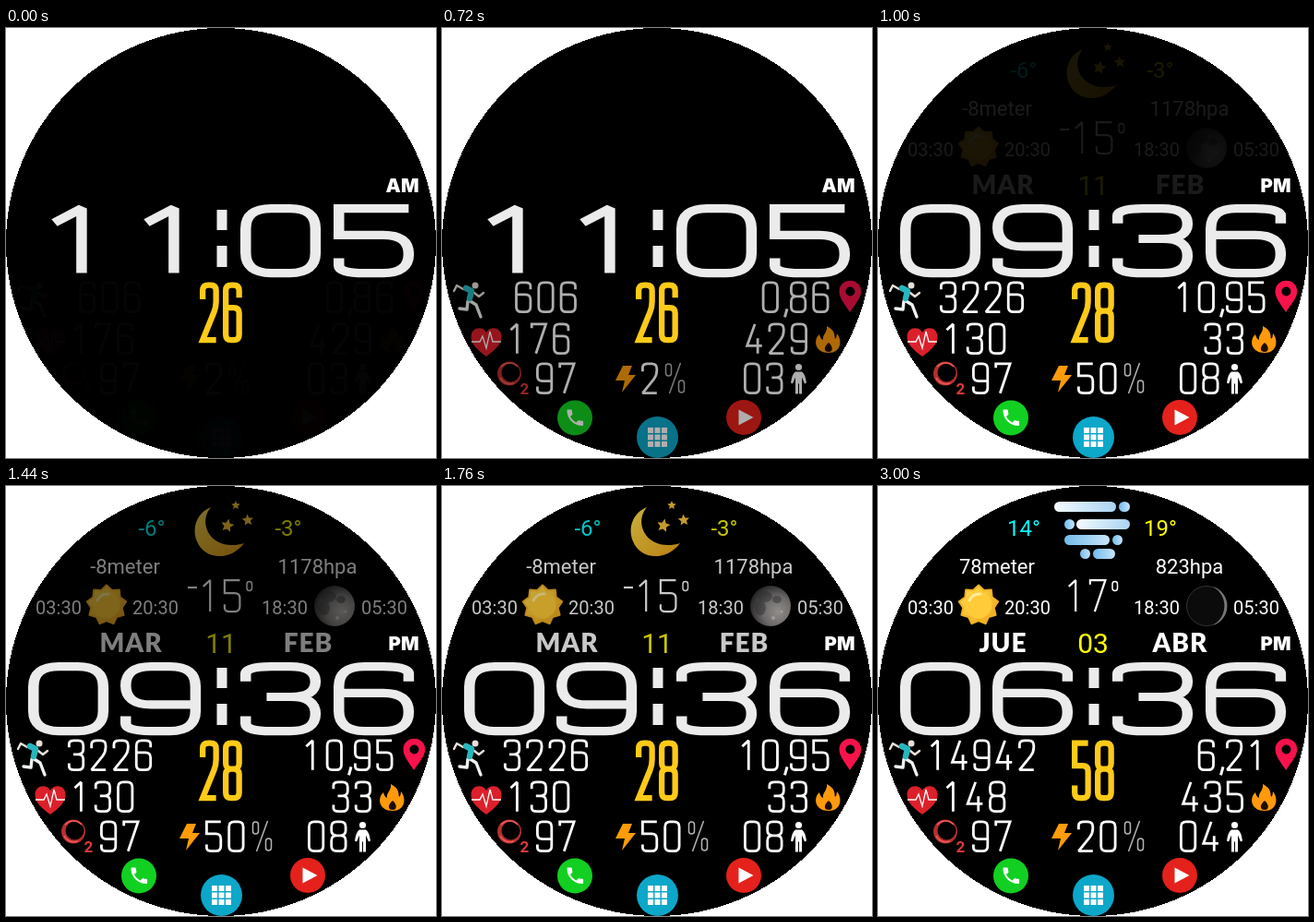
Recreate the animation shown at these times as an HTML page. Size 466 by 466 pixels, loop 4000 ms.

```html
<!DOCTYPE html>
<html lang="es">
<head>
<meta charset="utf-8">
<title>Watch face</title>
<style>
  html, body { margin: 0; width: 100%; height: 100%; overflow: hidden; background: #fff; }
  svg { display: block; width: 100vw; height: 100vh; }
  text { font-family: Roboto, sans-serif; fill: #fff; text-anchor: middle; }
  .label { font: 900 28px Lato, sans-serif; letter-spacing: 1px; }
  .half { font: 900 20.5px Inter, sans-serif; text-anchor: end; }
  .digits { fill: none; stroke: #fff; stroke-miterlimit: 2; }
</style>
</head>
<body>
<svg viewBox="0 0 466 466">
  <defs>
    <linearGradient id="gold" x1="0" y1="0" x2="1" y2="1">
      <stop offset="0" stop-color="#ffe04f"/><stop offset="1" stop-color="#f0a418"/>
    </linearGradient>
    <linearGradient id="cloud" x1="0" y1="0" x2="0" y2="1">
      <stop offset="0" stop-color="#fff"/><stop offset="1" stop-color="#c3cde6"/>
    </linearGradient>
    <linearGradient id="fog">
      <stop offset="0" stop-color="#f4faff"/><stop offset="1" stop-color="#a9d4f2"/>
    </linearGradient>
    <linearGradient id="mist">
      <stop offset="0" stop-color="#72bbeb"/><stop offset="1" stop-color="#c8e6fa"/>
    </linearGradient>
    <radialGradient id="lunar" cx=".68" cy=".64" r=".72">
      <stop offset="0" stop-color="#b8b4b1"/><stop offset=".5" stop-color="#8b8886"/>
      <stop offset="1" stop-color="#2c2c2f"/>
    </radialGradient>
  </defs>
  <circle cx="233" cy="233" r="233" shape-rendering="crispEdges"/>

  <g id="top">
    <g id="weather"></g>
    <g id="topText"></g>
    <path id="sun" fill="url(#gold)" stroke="#f3b126" stroke-width="2" stroke-linejoin="round"/>
    <circle cx="109" cy="129" r="14.500" fill="#ffcb38"/>
    <path d="M99 124q4-8 12-7" fill="none" stroke="#ffea9a" stroke-width="3" stroke-linecap="round"/>
    <g id="moon"></g>
  </g>

  <g id="clock"></g>

  <g id="low">
    <g id="stats"></g>
    <!-- runner -->
    <g fill="none" stroke-linecap="round" stroke-linejoin="round">
      <path d="M29 295l8 5 5 13M28 296l-1 9-8-1" stroke="#eef2f2" stroke-width="3.400"/>
      <path d="M23 283l-7-4-3 6M35 287l5 4 5-4" stroke="#e8dfd8" stroke-width="2.400"/>
      <path d="M26 282l6 3-2 8" stroke="#27b6bd" stroke-width="6.500"/>
      <circle cx="36" cy="279" r="3.500" fill="#e8dfd8"/>
    </g>
    <!-- heart -->
    <path d="M48 356C39 349 31 343 31.500 334C32 325 43 322 48 330C53 322 64 325 64.500 334C65 343 57 349 48 356Z" fill="#dc202b"/>
    <path d="M32 340h9l3-6 4 13 4-18 3 11h9" fill="none" stroke="#fff" stroke-width="1.300"/>
    <!-- oxygen -->
    <path fill="#b52f31" fill-rule="evenodd" d="M60 374.500a13 13 0 0 1 26 0a13 13 0 0 1-26 0zM64.500 373.500a10 10 0 0 0 20 0a10 10 0 0 0-20 0z"/>
    <path d="M64 367a12 12 0 0 1 18 0M63 379a12 12 0 0 0 15 6" fill="none" stroke="#ee5a54" stroke-width="1.600"/>
    <text x="89.500" y="397" style="font-size:17px;font-weight:700;fill:#d8393b">2</text>
    <!-- bolt -->
    <path d="M196 366h10l-4 10h8l-15 19 3-13h-10z" fill="#ff9c0a"/>
    <!-- pin -->
    <path d="M442 308C437 300 430.500 293 430.500 285.500A11.800 11.800 0 0 1 454.200 285.500C454.200 293 447 300 442 308Z" fill="#f8124b"/>
    <circle cx="442.400" cy="285.500" r="5"/>
    <!-- flame -->
    <path d="M417 323C427 328 425 334 426 337Q428 335 428 331C434 338 433 352 419 352C404 352 402 338 409 332Q410 337 413 338C412 332 418 330 417 323Z" fill="#ff9a0c"/>
    <path d="M419 341c5 4 5 10 0 10s-6-5 0-10z" fill="#1c0d00"/>
    <!-- person -->
    <circle cx="386.500" cy="367.500" r="3.600" fill="#fff"/>
    <path d="M383 372.500h7q3.500 2 5 12l-2 1-3-7v18h-3v-11h-1v11h-3v-18l-3 7-2-1q1.500-10 5-12z" fill="#fff"/>
    <!-- buttons -->
    <circle cx="144" cy="422.500" r="19" fill="#12d021"/>
    <path transform="translate(132.500 410.500)scale(.98)" fill="#fff" d="M6.600 10.800c1.400 2.800 3.800 5.100 6.600 6.600l2.200-2.200c.3-.3.7-.4 1-.2 1.100.4 2.300.6 3.600.6.6 0 1 .4 1 1V20c0 .6-.4 1-1 1C10.600 21 3 13.400 3 4c0-.6.5-1 1-1h3.500c.6 0 1 .4 1 1 0 1.300.2 2.500.6 3.600.1.3 0 .7-.2 1z"/>
    <circle cx="233.500" cy="443.500" r="22.500" fill="#0ca7c9"/>
    <g id="grid" fill="#fff"></g>
    <circle cx="327" cy="422" r="19" fill="#e5211b"/>
    <path d="M321.500 413.500v17l16-8.500z" fill="#fff"/>
  </g>
</svg>

<script>
const $ = id => document.getElementById(id);

// Centre lines in a unit box; "!" keeps a corner sharp, "|" starts a new stroke.
const GLYPHS = {
  0: '0,0 1,0 1,1 0,1z',
  1: '.1,.2! .55,0! .55,1',
  2: '0,.26 0,0 1,0 1,.4 0,1! 1,1',
  3: '0,.23 0,0 1,0 1,.47 .3,.47|.3,.47 1,.47 1,1 0,1 0,.77',
  4: '.55,0 0,.74! 1.05,.74|.75,.48 .75,1',
  5: '1,0 0,0! 0,.41! 1,.41 1,1 0,1 0,.77',
  6: '1,.23 1,0 0,0 0,1 1,1 1,.41 0,.41',
  7: '0,.14 0,0! 1,0! .3,1',
  8: '0,0 1,0 1,.47 0,.47z|0,.47 1,.47 1,1 0,1z',
  9: '0,.77 0,1 1,1 1,0 0,0 0,.59 1,.59'
};
const WIDE = {
  ...GLYPHS,
  1: '.3,.22 .69,0! .69,1',
  2: '0,.25 0,0 1,0 1,.53 0,.53 0,1! 1,1'
};

const FONTS = {
  stat: { w: 15.4, h: 31.8, r: 5.5, s: 2.8, pitch: 24.3, set: GLYPHS },
  temp: { w: 16.5, h: 34, r: 5.5, s: 2.2, pitch: 24.8, set: GLYPHS },
  sec: { w: 14.5, h: 59.5, r: 6, s: 6.3, pitch: 25, set: GLYPHS },
  wide: { w: 60.5, h: 70, r: 22, s: 9.2, pitch: 0, set: WIDE }
};

function trace(spec, { w, h, r }) {
  const at = (p, q, d) => {
    const len = Math.hypot(q.x - p.x, q.y - p.y), k = Math.min(d / len, 0.5);
    return `${(p.x + (q.x - p.x) * k).toFixed(2)} ${(p.y + (q.y - p.y) * k).toFixed(2)}`;
  };
  return spec.split('|').map(part => {
    const closed = part.endsWith('z');
    const pts = part.split(' ').map(t => {
      const [x, y] = t.split(',').map(v => parseFloat(v));
      return { x: x * w, y: y * h, sharp: t.endsWith('!') };
    });
    const n = pts.length;
    let d = 'M' + at(pts[0], pts[1], closed ? r : 0);
    for (let i = 1; i < (closed ? n + 1 : n - 1); i++) {
      const p = pts[i % n], a = pts[i - 1], b = pts[(i + 1) % n];
      d += p.sharp ? `L${p.x} ${p.y}` : `L${at(p, a, r)}Q${p.x} ${p.y} ${at(p, b, r)}`;
    }
    return d + (closed ? 'Z' : 'L' + at(pts[n - 1], pts[0], 0));
  }).join('');
}

function glyph(ch, x, y, f, stretch = 1) {
  return `<path d="${trace(f.set[ch], f)}" stroke-width="${f.s}" ` +
    `transform="translate(${x + f.s * stretch / 2} ${y + f.s / 2})scale(${stretch} 1)"/>`;
}

const COMMA = 6;
const span = (str, f) => [...str].reduce((sum, c) => sum + (c === ',' ? COMMA : f.pitch), 0)
  - f.pitch + f.w + f.s;

// align: 0 left, .5 centre, 1 right
function digits(str, x, y, f, align = 0) {
  x -= span(str, f) * align;
  let out = '';
  for (const ch of str) {
    if (ch === ',') {
      out += `<path d="M${x + 3} ${y + f.h - 2}l-2.500 9" stroke-width="3"/>`;
      x += COMMA;
    } else {
      out += glyph(ch, x, y, f);
      x += f.pitch;
    }
  }
  return out;
}

const percent = x => `<g stroke="#b4b4b4" stroke-width="1.500">
  <rect x="${x + 1}" y="364" width="6" height="13" rx="3"/>
  <rect x="${x + 15}" y="382" width="6" height="13" rx="3"/>
  <path d="M${x + 17} 363L${x + 5} 396"/></g>`;

const label = (str, x, y, size, fill = '#fff') =>
  `<text x="${x}" y="${y}" style="font-size:${size}px;fill:${fill}">${str}</text>`;

function spikes(cx, cy, n, outer, inner, turn = 0) {
  let d = '';
  for (let i = 0; i < n * 2; i++) {
    const a = i * Math.PI / n + turn - Math.PI / 2, r = i % 2 ? inner : outer;
    d += `${i ? 'L' : 'M'}${(cx + r * Math.cos(a)).toFixed(1)} ${(cy + r * Math.sin(a)).toFixed(1)}`;
  }
  return d + 'Z';
}

function flake(x, y, r) {
  let out = '';
  for (let a = 0; a < 360; a += 60)
    out += `<path transform="translate(${x} ${y})rotate(${a})scale(${r / 10})"
      d="M0 0V-10M-3-9L0-6L3-9"/>`;
  return out;
}

const bar = (x, y, w, fill) =>
  `<rect x="${x}" y="${y}" width="${w}" height="11" rx="5.500" fill="url(#${fill})"/>`;

const WEATHER = {
  none: '',
  night: `<path d="M222 23C207 29 201 45 207 60C214 79 242 83 258 62C242 67 226 63 219 50C214 40 216 30 222 23Z" fill="url(#gold)"/>
    <path d="${spikes(249, 21, 5, 5, 2.3)}${spikes(240, 43, 5, 7.5, 3.5, 0.2)}${spikes(262, 37, 5, 6.5, 3, -0.1)}" fill="#fbc638"/>`,
  snow: `<path d="M212 61A11.500 11.500 0 0 1 208 38A12 12 0 0 1 220 28A17 17 0 0 1 250 30A14 14 0 0 1 257 40A10.800 10.800 0 0 1 257 61Z" fill="url(#cloud)"/>
    <g fill="none" stroke="#5fc6d4" stroke-width="1.500">${flake(219, 71, 11)}${flake(250, 70.5, 10.5)}${flake(236.5, 81, 6)}</g>`,
  fog: bar(191, 17, 67, 'fog') + bar(261, 17, 12, 'mist') + bar(202, 36, 11, 'mist') +
    bar(215, 36, 58, 'fog') + bar(202, 53, 49, 'mist') + bar(254, 53, 11, 'mist') +
    bar(219, 68, 11, 'mist') + bar(233, 68, 24, 'mist')
};

const MOON = {
  full: `<circle cx="356" cy="130" r="22" fill="url(#lunar)"/>
    <g fill="#3c3b3d" opacity=".5"><ellipse cx="350" cy="120" rx="8" ry="6"/>
    <ellipse cx="363" cy="123" rx="5" ry="4"/><ellipse cx="345" cy="132" rx="6" ry="8"/></g>
    <g fill="#dcd9d6" opacity=".7"><circle cx="359" cy="143" r="2"/><circle cx="368" cy="136" r="1.500"/></g>`,
  thin: `<circle cx="356" cy="130" r="21.500" fill="#0b0b0c" stroke="#333" stroke-width="1"/>
    <path d="M363 109A22 22 0 0 1 363 151A24 24 0 0 0 363 109Z" fill="#777"/>`
};

const FACES = [
  { time: '1105', half: 'AM', sec: '26', steps: '606', km: '0,86', pulse: '176', kcal: '429',
    charge: '2', stood: '03', sky: 'none' },
  { time: '0936', half: 'PM', sec: '28', steps: '3226', km: '10,95', pulse: '130', kcal: '33',
    charge: '50', stood: '08', sky: 'night', low: '-6°', high: '-3°', alt: '-8', press: '1178',
    temp: '-15', day: 'MAR', date: '11', month: 'FEB', moon: 'full' },
  { time: '0902', half: 'AM', sec: '27', steps: '11424', km: '13,66', pulse: '46', kcal: '375',
    charge: '66', stood: '12', sky: 'snow', low: '-12°', high: '-4°', alt: '108', press: '1079',
    temp: '-10', day: 'MIE', date: '12', month: 'MAR', moon: 'full' },
  { time: '0636', half: 'PM', sec: '58', steps: '14942', km: '6,21', pulse: '148', kcal: '435',
    charge: '20', stood: '04', sky: 'fog', low: '14°', high: '19°', alt: '78', press: '823',
    temp: '17', day: 'JUE', date: '03', month: 'ABR', moon: 'thin' }
];

function drawTop(f) {
  $('weather').innerHTML = WEATHER[f.sky];
  if (!f.temp) return;
  const cold = f.temp[0] === '-', num = f.temp.replace('-', ''), x = cold ? 211 : 204;
  $('moon').innerHTML = MOON[f.moon];
  $('topText').innerHTML =
    label(f.low, 158, 53.5, 24, '#0ff') + label(f.high, 306, 53.5, 24, '#ff0') +
    label(f.alt + 'meter', 129, 95, 22) + label(f.press + 'hpa', 337.5, 95, 22) +
    label('03:30', 57, 139, 20) + label('20:30', 162, 139, 20) +
    label('18:30', 302, 139, 20) + label('05:30', 410, 139, 20) +
    label(f.date, 233, 181, 30, '#ff0') +
    `<text class="label" x="135.500" y="180">${f.day}</text>
     <text class="label" x="327.500" y="180">${f.month}</text>
     <g class="digits">${digits(num, x, 101, FONTS.temp)}
     ${cold ? '<path d="M197 110h10" stroke-width="2.200"/>' : ''}
     <rect x="${x + 50}" y="103.500" width="5.500" height="10" rx="2.700" stroke-width="1.500"/></g>`;
}

function drawFace(f) {
  drawTop(f);
  const { stat, sec, wide } = FONTS, cells = [24, 124, 254, 355];
  $('clock').innerHTML =
    `<g class="digits" style="stroke:#ebebeb">${[...f.time].map((c, i) => glyph(c, cells[i], 191, wide, 1.25)).join('')}
     <path d="M234 197v22M234 236v23" stroke-width="11"/></g>
     <g class="digits" style="stroke:#ffca18">${digits(f.sec, 210, 275.5, sec)}</g>
     <text class="half" x="447.500" y="178">${f.half}</text>`;
  $('stats').innerHTML = '<g class="digits">' +
    digits(f.steps, 112.5, 274.5, stat, 0.5) + digits(f.km, 419.5, 274.5, stat, 1) +
    digits(f.pulse, 71.5, 319.5, stat) + digits(f.kcal, 396, 319.5, stat, 1) +
    digits('97', 102, 362.5, stat) + digits(f.charge, 216, 362.5, stat) +
    percent(216.5 + f.charge.length * 25) + digits(f.stood, 369.5, 362.5, stat, 1) + '</g>';
}

$('sun').setAttribute('d', spikes(109, 129, 9, 21.5, 17));
for (let i = 0; i < 9; i++)
  $('grid').innerHTML += `<rect x="${223 + i % 3 * 7.5}" y="${433 + Math.floor(i / 3) * 7.5}" width="6" height="6"/>`;

let shown = -1;
function render(ms) {
  const t = ms % 4000, n = Math.floor(t / 1000);
  const step = Math.min(Math.floor((t % 1000) / 40) * 40, 760) / 1000;
  if (n !== shown) drawFace(FACES[shown = n]);
  $('low').setAttribute('opacity', n ? 1 : step < 0.12 ? 0.02 : step ** 1.15);
  $('top').setAttribute('opacity', n > 1 ? 1 : n ? 0.1 + (step < 0.08 ? 0 : 0.9 * step) : 0);
}

const start = performance.now();
function tick() {
  render(performance.now() - start);
  requestAnimationFrame(tick);
}
tick();
</script>
</body>
</html>
```
